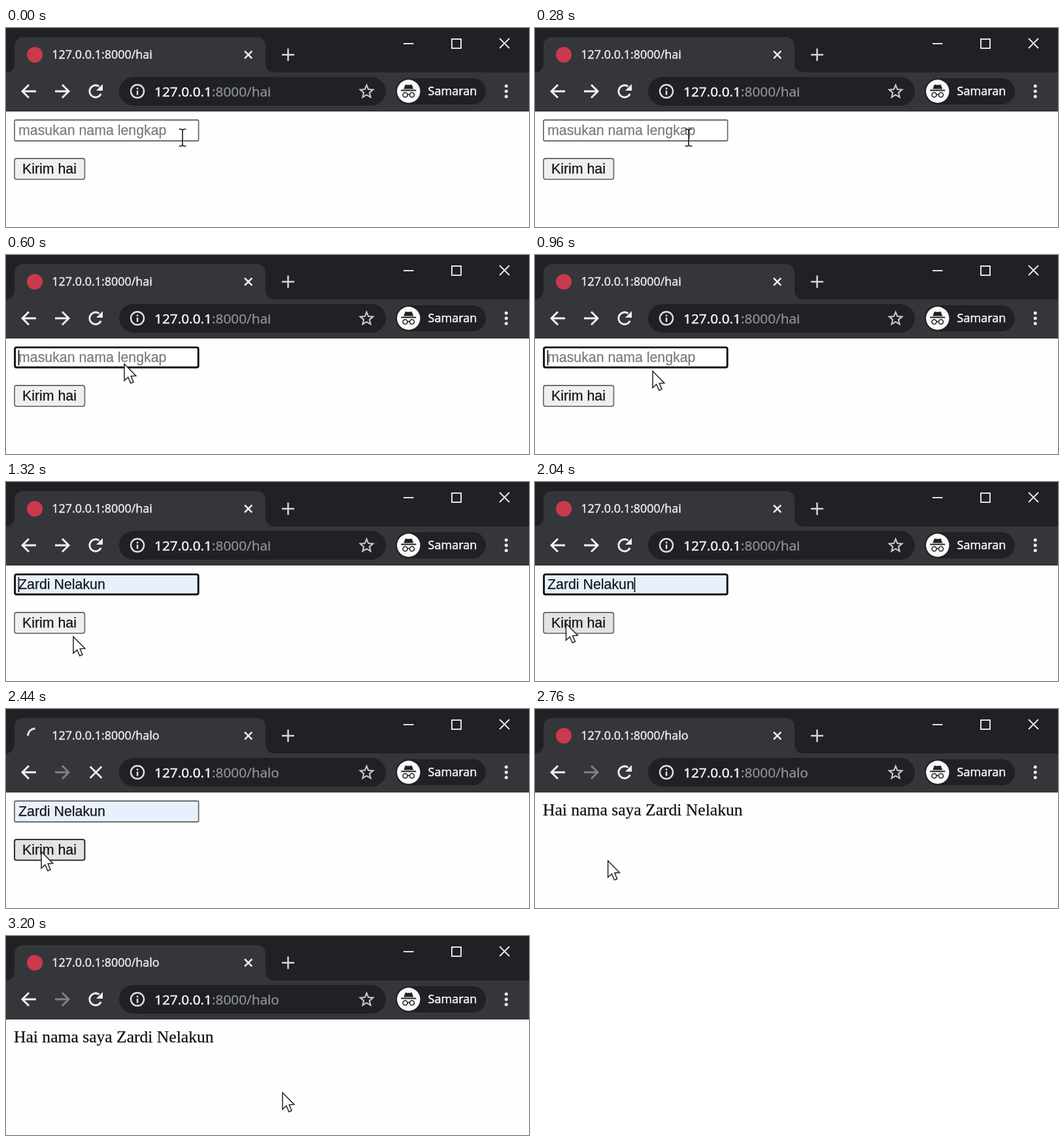
Recreate the animation shown at these times as an HTML page with a canvas. Size 800x305 px, loop 3240 ms.

```html
<!DOCTYPE html>
<html lang="id">
<head>
<meta charset="utf-8">
<title>Formulir hai</title>
<style>
html, body { margin: 0; width: 100%; height: 100%; overflow: hidden; background: #fefefe; }
canvas { display: block; width: 800px; height: 305px; }
</style>
</head>
<body>
<canvas id="stage"></canvas>
<script>
const W = 800, H = 305, LOOP = 3240, STEP = 40;
const NAME = 'Zardi Nelakun';
const UI = '"Open Sans", "Noto Sans", sans-serif';
const ARIAL = '"Liberation Sans", Arial, sans-serif';
const TIMES = '"Liberation Serif", "Times New Roman", serif';
const DARK = '#202124', BAR = '#35363a', LIGHT = '#f1f3f4';

// Moments of the interaction, in ms
const AT = { focus: 520, arrow: 600, preview: 1240, fill: 1720, hover: 1920,
             submit: 2200, commit: 2280, result: 2640, loaded: 2720 };

// Pointer path: time, x, y
const PATH = [
  [0, 270, 168], [80, 264, 168], [280, 235, 168], [480, 184, 165], [600, 181, 167],
  [800, 181, 174], [960, 180, 178], [1120, 122, 231], [1240, 103, 237], [1480, 103, 237],
  [1720, 94, 232], [2040, 47.5, 217], [2200, 54, 218.5], [2640, 54, 218.5], [2840, 150, 242],
  [3080, 405, 242], [3200, 423, 240]
];

const canvas = document.getElementById('stage');
const ctx = canvas.getContext('2d');
const dpr = window.devicePixelRatio || 1;
canvas.width = W * dpr;
canvas.height = H * dpr;

function pointer(t) {
  let i = 0;
  while (i < PATH.length - 2 && PATH[i + 1][0] <= t) i++;
  const [t0, x0, y0] = PATH[i], [t1, x1, y1] = PATH[i + 1];
  const k = Math.min(1, (t - t0) / (t1 - t0));
  return [x0 + (x1 - x0) * k, y0 + (y1 - y0) * k];
}

// Draws text with a thin outline for extra weight; returns its right end
function text(str, x, y, font, color, weight) {
  ctx.font = font;
  ctx.fillStyle = ctx.strokeStyle = color;
  ctx.lineWidth = weight;
  ctx.lineJoin = 'round';
  ctx.fillText(str, x, y);
  ctx.strokeText(str, x, y);
  ctx.lineJoin = 'miter';
  return x + ctx.measureText(str).width;
}

function rect(x, y, w, h, color) {
  ctx.fillStyle = color;
  ctx.fillRect(x, y, w, h);
}

function round(x, y, w, h, r, fill, stroke, lw) {
  ctx.beginPath();
  ctx.roundRect(x, y, w, h, r);
  if (fill) { ctx.fillStyle = fill; ctx.fill(); }
  if (stroke) { ctx.strokeStyle = stroke; ctx.lineWidth = lw; ctx.stroke(); }
}

function disc(x, y, r, color) {
  ctx.fillStyle = color;
  ctx.beginPath();
  ctx.arc(x, y, r, 0, Math.PI * 2);
  ctx.fill();
}

function arc(x, y, r, from, to, color, lw) {
  ctx.strokeStyle = color;
  ctx.lineWidth = lw;
  ctx.beginPath();
  ctx.arc(x, y, r, from, to);
  ctx.stroke();
}

function lines(color, lw, ...runs) {
  ctx.strokeStyle = color;
  ctx.lineWidth = lw;
  ctx.beginPath();
  for (const run of runs)
    for (let i = 0; i < run.length; i += 2)
      i ? ctx.lineTo(run[i], run[i + 1]) : ctx.moveTo(run[i], run[i + 1]);
  ctx.stroke();
}

function cross(x, y, r, color, lw) {
  lines(color, lw, [x - r, y - r, x + r, y + r], [x - r, y + r, x + r, y - r]);
}

function navArrow(x, y, dir, color) {
  lines(color, 2.9, [x - 11 * dir, y, x + 10 * dir, y],
    [x, y - 10, x + 10 * dir, y, x, y + 10]);
}

function reload(x, y) {
  arc(x, y, 9.2, 0.45, 5.35, LIGHT, 2.9);
  ctx.fillStyle = LIGHT;
  ctx.beginPath();
  ctx.moveTo(x + 11, y - 11);
  ctx.lineTo(x + 11, y - 1);
  ctx.lineTo(x + 1, y - 1);
  ctx.fill();
}

function star(x, y) {
  ctx.beginPath();
  for (let i = 0; i < 10; i++) {
    const a = -Math.PI / 2 + i * Math.PI / 5, r = i % 2 ? 4.6 : 10.3;
    ctx.lineTo(x + r * Math.cos(a), y + 0.8 + r * Math.sin(a));
  }
  ctx.closePath();
  ctx.strokeStyle = '#c8cacd';
  ctx.lineWidth = 2.1;
  ctx.stroke();
}

function hatAndGlasses(x, y) {
  disc(x, y, 17.7, '#fafafa');
  rect(x - 11.5, y - 2.4, 23, 2, DARK);
  ctx.beginPath();
  ctx.moveTo(x - 7.5, y - 3.6);
  ctx.lineTo(x - 4.8, y - 10.5);
  ctx.quadraticCurveTo(x, y - 8.8, x + 4.8, y - 10.5);
  ctx.lineTo(x + 7.5, y - 3.6);
  ctx.fill();
  arc(x - 5.2, y + 5.5, 3.5, 0, 7, DARK, 1.6);
  arc(x + 5.2, y + 5.5, 3.5, 0, 7, DARK, 1.6);
  lines(DARK, 1.5, [x - 2, y + 4.8, x + 2, y + 4.8]);
}

function browser(t) {
  const page = t >= AT.commit ? 'halo' : 'hai';
  const loading = t >= AT.submit && t < AT.loaded;

  rect(0, 0, W, 68, DARK);
  rect(0, 68, W, 60, BAR);

  // Tab with flared feet
  ctx.fillStyle = BAR;
  ctx.beginPath();
  ctx.moveTo(0, 68);
  ctx.arcTo(13, 68, 13, 54, 13);
  ctx.arcTo(13, 14, 30, 14, 13);
  ctx.arcTo(397, 14, 397, 30, 13);
  ctx.arcTo(397, 68, 410, 68, 13);
  ctx.lineTo(410, 68);
  ctx.fill();

  if (loading) {
    const a = Math.PI + (t - 2440) / 1568 * Math.PI * 2;
    arc(44.5, 41, 11, a, a + Math.PI / 2, '#e0e1e3', 3);
  } else {
    disc(44, 41, 12, '#c93a4c');
  }
  text('127.0.0.1:8000/' + page, 70.3, 47.2, '17.9px ' + UI, '#eceef0', 0.45);
  cross(370.7, 41, 5.6, LIGHT, 2.5);
  lines('#d5d7da', 2.5, [422, 41, 441, 41], [431.5, 31.5, 431.5, 50.5]);

  lines('#ededed', 1.9, [608, 24, 623.5, 24]);
  ctx.strokeRect(682, 17, 14, 14);
  cross(762.5, 23.5, 7.5, '#ededed', 1.8);

  navArrow(35, 97, -1, LIGHT);
  navArrow(86, 97, 1, t >= AT.commit ? '#808286' : LIGHT);
  if (loading) cross(137.5, 97, 8.8, LIGHT, 2.7);
  else reload(137, 97);

  round(173, 75, 408, 44, 22, DARK);
  arc(201, 97, 10, 0, 7, '#dfe1e5', 2.4);
  rect(199.8, 91.5, 2.5, 2.6, '#dfe1e5');
  rect(199.8, 96, 2.5, 6.6, '#dfe1e5');
  const x = text('127.0.0.1', 227, 104.5, '20.8px ' + UI, '#f3f4f5', 0.55);
  text(':8000/' + page, x, 104.5, '20.8px ' + UI, '#8f9296', 0.35);
  star(551.6, 97);

  round(596, 77, 138, 40, 20, DARK);
  hatAndGlasses(615.8, 97);
  text('Samaran', 645.5, 103, '18px ' + UI, '#f5f5f5', 0.55);
  for (const y of [89, 97, 105]) disc(765.2, y, 2.5, LIGHT);
}

function form(t) {
  const focused = t >= AT.focus && t < AT.submit;
  const named = t >= AT.preview;
  const fill = named ? '#e8f0fe' : '#fff';
  const font = '21.333px ' + ARIAL;

  if (focused) round(13.6, 141.6, 280.6, 30.6, 2.5, fill, '#101014', 2.9);
  else round(13, 141, 281.6, 32, 2, fill, '#6e6e6e', 1.8);
  text(named ? NAME : 'masukan nama lengkap', 19, 164, font,
    named ? '#151515' : '#7b7b7b', 0.25);
  if (focused) rect(t >= AT.fill ? 151.6 : 18.6, 146, 1.7, 23, '#111');

  const pressed = t >= AT.submit;
  round(13, 200, 107.4, 31.8, 3, t >= AT.hover ? '#e4e3e4' : '#efefef',
    pressed ? '#333' : '#707070', pressed ? 2.1 : 1.8);
  text('Kirim hai', 25, 223, font, '#111', 0.25);
}

function ibeam(x, y) {
  lines('#222', 1.7, [x, y - 12, x, y + 12],
    [x - 5.5, y - 13, x - 2, y - 13, x, y - 11.5, x + 2, y - 13, x + 5.5, y - 13],
    [x - 5.5, y + 13, x - 2, y + 13, x, y + 11.5, x + 2, y + 13, x + 5.5, y + 13]);
}

function arrow(x, y) {
  const pts = [0, 0, 0, 25.5, 5.8, 20.2, 9.8, 29.5, 14, 27.7, 10.2, 18.7, 17.8, 18.2];
  ctx.beginPath();
  for (let i = 0; i < pts.length; i += 2) ctx.lineTo(x + pts[i], y + pts[i + 1]);
  ctx.closePath();
  ctx.fillStyle = '#fff';
  ctx.fill();
  ctx.strokeStyle = '#222';
  ctx.lineWidth = 1.5;
  ctx.stroke();
}

function draw(t) {
  ctx.setTransform(dpr, 0, 0, dpr, 0, 0);
  rect(0, 0, W, H, '#fefefe');
  browser(t);
  if (t < AT.result) form(t);
  else text('Hai nama saya ' + NAME, 12, 163, '25.6px ' + TIMES, '#111', 0.25);
  const [x, y] = pointer(t);
  (t < AT.arrow ? ibeam : arrow)(x, y);
}

const start = performance.now();
function tick() {
  const t = (performance.now() - start) % LOOP;
  draw(Math.floor(t / STEP) * STEP);
  requestAnimationFrame(tick);
}
tick();
</script>
</body>
</html>
```
